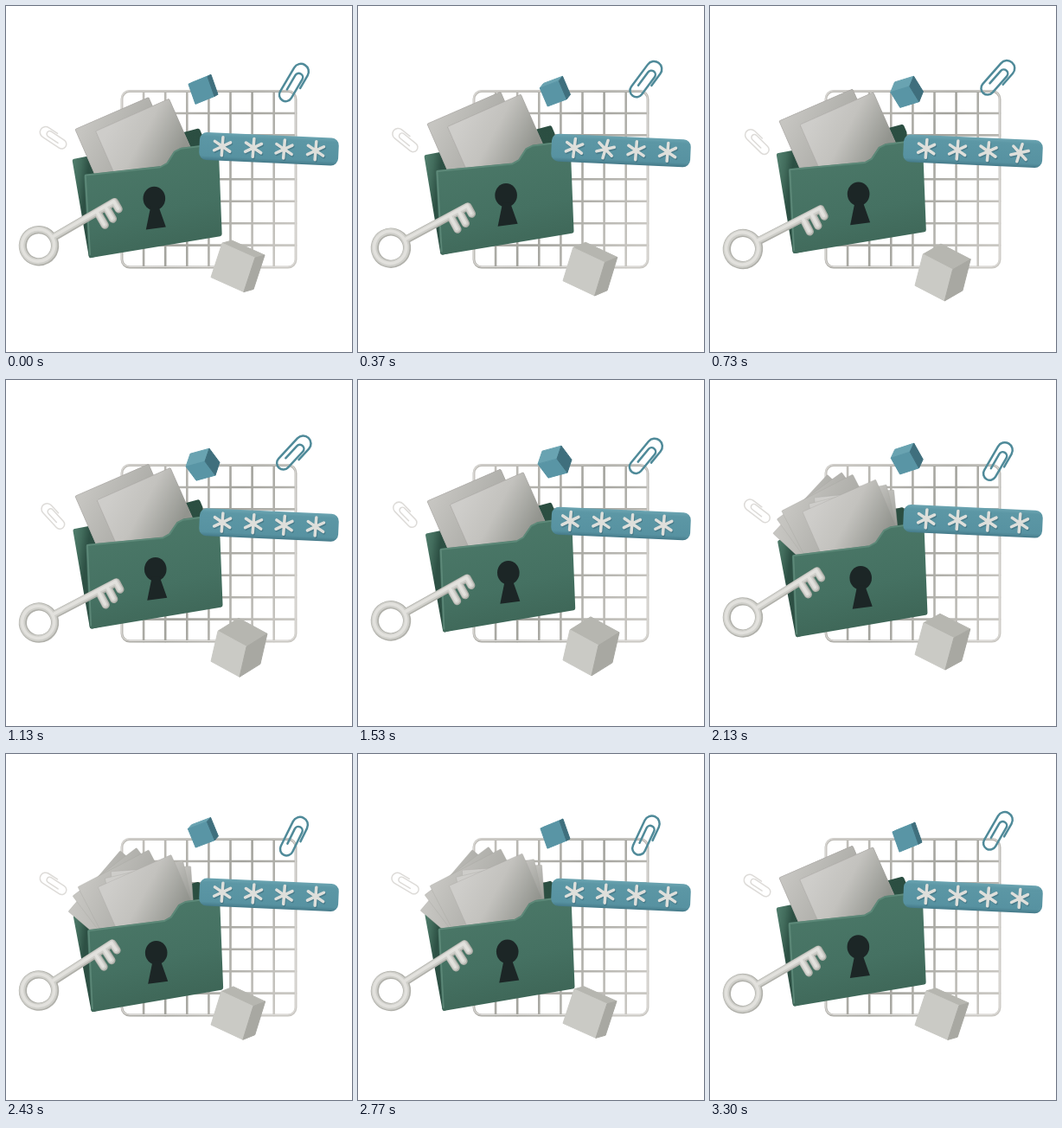
Animation, 400 px wide and 400 px high, one loop 3.33 s. Source, as an HTML page:

```html
<!DOCTYPE html>
<html lang="en">
<head>
<meta charset="utf-8">
<title>Secure folder</title>
<style>
  html, body { margin: 0; width: 100%; height: 100%; overflow: hidden; background: #fff; }
  svg { display: block; width: 100vw; height: 100vh; }
  .line { fill: none; stroke-linecap: round; stroke-linejoin: round; }
  .round { stroke-linejoin: round; stroke-width: 5; }
</style>
</head>
<body>
<svg viewBox="0 0 400 400">
  <defs>
    <linearGradient id="green" gradientUnits="userSpaceOnUse" x1="150" y1="165" x2="180" y2="290">
      <stop offset="0" stop-color="#4b7868"/><stop offset=".6" stop-color="#457162"/><stop offset="1" stop-color="#3e6657"/>
    </linearGradient>
    <linearGradient id="dark" gradientUnits="userSpaceOnUse" x1="78" y1="180" x2="228" y2="200">
      <stop offset="0" stop-color="#4f7c6b"/><stop offset=".06" stop-color="#426c5c"/>
      <stop offset=".12" stop-color="#2d5044"/><stop offset="1" stop-color="#2b4e41"/>
    </linearGradient>
    <linearGradient id="sheet" x1=".2" y1="0" x2=".85" y2=".75">
      <stop offset="0" stop-color="#cecdca"/><stop offset=".45" stop-color="#c3c2be"/><stop offset="1" stop-color="#92948e"/>
    </linearGradient>
    <linearGradient id="sheetBack" x1=".1" y1="0" x2=".8" y2=".8">
      <stop offset="0" stop-color="#c6c5c1"/><stop offset="1" stop-color="#a3a39e"/>
    </linearGradient>
    <linearGradient id="wire" gradientUnits="userSpaceOnUse" x1="134" y1="150" x2="335" y2="250">
      <stop offset="0" stop-color="#c0beb9"/><stop offset=".5" stop-color="#a3a39d"/><stop offset="1" stop-color="#c9c7c2"/>
    </linearGradient>
    <linearGradient id="teal" x1="0" y1="0" x2="0" y2="1">
      <stop offset="0" stop-color="#6ba4b1"/><stop offset=".15" stop-color="#5c97a5"/>
      <stop offset=".85" stop-color="#5792a1"/><stop offset="1" stop-color="#457a89"/>
    </linearGradient>
    <path id="clipShape" d="M9 2V-15a9 9 0 0 0-18 0V17a7.500 7.500 0 0 0 15 0V-8a4.700 4.700 0 0 0-9.400 0V11"/>
    <path id="starShape" d="M0-10.500V10.500M-9.100-5.200L9.100 5.200M-9.100 5.200L9.100-5.200"/>
    <g id="keyShape">
      <circle r="18.600"/>
      <path d="M19 0H101M78 1V17.500M89.500 1V16M101 1V9.500"/>
    </g>
  </defs>

  <g class="line" stroke="url(#wire)" stroke-width="2.600">
    <path id="mesh"/>
    <rect x="134" y="98.500" width="201" height="203.500" rx="9" stroke-width="2.900"/>
    <rect x="133.700" y="98" width="201" height="203.500" rx="9" stroke="#dddbd8" stroke-width="1.200"/>
  </g>

  <polygon id="back" class="round" fill="url(#dark)" stroke="url(#dark)"/>
  <g id="sheets"></g>
  <polygon id="front" class="round" fill="url(#green)" stroke="url(#green)"/>
  <polyline id="rim" class="line" stroke="#6b9786" stroke-width="1.800" opacity=".6"/>
  <g id="hole" fill="#1c2626">
    <ellipse rx="12.800" ry="13.800"/>
    <path d="M-4 9L-9.500 36 13.500 33 5 9z"/>
  </g>

  <g id="whiteCube"></g>
  <g id="blueCube"></g>

  <g id="bar">
    <rect x="-80.500" y="-16" width="161" height="32" rx="8.500" fill="url(#teal)"/>
    <g id="stars" class="line" stroke-width="3.500"></g>
  </g>

  <g id="blueClip" class="line" stroke="#4f8a99" stroke-width="2.500"><use href="#clipShape"/></g>
  <g id="whiteClip" class="line" stroke="#dddbd8" stroke-width="2.100"><use href="#clipShape"/></g>

  <g id="key" class="line">
    <use href="#keyShape" stroke="#b0b0aa" stroke-width="9.200"/>
    <use href="#keyShape" stroke="#cfcfca" stroke-width="7" x="-.3" y="-.6"/>
    <use href="#keyShape" stroke="#e2e1dd" stroke-width="3.600" x="-.4" y="-1"/>
  </g>
</svg>
<script>
const LOOP = 3330;
const $ = id => document.getElementById(id);
let now = 0;

// Sine swing around mid that is highest at the time peak
const wave = (mid, amp, peak) => mid + amp * Math.cos(2 * Math.PI * (now - peak) / LOOP);
const ease = x => { x = Math.min(1, Math.max(0, x)); return x * x * (3 - 2 * x); };
const bump = (mid, half) => {
  const d = Math.abs(now - mid) / half;
  return d < 1 ? (1 + Math.cos(Math.PI * d)) / 2 : 0;
};
const mix = (a, b, k) => a + (b - a) * k;
const points = (el, list) => el.setAttribute('points', list.map(p => p.map(v => v.toFixed(2)).join()).join(' '));
const place = (id, x, y, turn = 0, scale = 1) =>
  $(id).setAttribute('transform', `translate(${x} ${y}) rotate(${turn}) scale(${scale})`);
const add = (parent, tag, attrs) => {
  const el = document.createElementNS('http://www.w3.org/2000/svg', tag);
  for (const name in attrs) el.setAttribute(name, attrs[name]);
  return parent.appendChild(el);
};

let mesh = '';
for (let i = 1; i < 8; i++) mesh += `M${134 + 25.1 * i} 99V302M134 ${98.5 + 25.45 * i}H335`;
$('mesh').setAttribute('d', mesh);

// Fan offsets of each sheet: x, y, turn
const sheets = [
  ['back', -8, 30, -26], ['back', -3, 12, -13.5], ['back', 3, 1.5, -4],
  ['front', 15, -18, 20], ['front', 8, -10, 10.8], ['front', 0, 0, 0]
].map(([base, dx, dy, turn]) => ({
  base, dx, dy, turn,
  el: add($('sheets'), 'rect', {
    width: 92.5, height: 84, rx: 1,
    fill: base === 'front' ? 'url(#sheet)' : 'url(#sheetBack)',
    stroke: '#a3a29d', 'stroke-width': .5, 'stroke-opacity': .6
  })
}));

const stars = [-54, -18, 17.5, 54].map(x => {
  const el = add($('stars'), 'g', {});
  add(el, 'use', { href: '#starShape', stroke: '#3c6b79', x: 1, y: 1.3, opacity: .6 });
  add(el, 'use', { href: '#starShape', stroke: '#dedfdb' });
  return { x, el };
});

// A cube pose is its near corner followed by its left, right and down edges
function makeCube(id, colors, from, to) {
  const faces = colors.map(c => add($(id), 'polygon', { fill: c, stroke: c, 'stroke-linejoin': 'round' }));
  return (k, dy) => {
    const [x, y, lx, ly, rx, ry, bx, by] = from.map((v, i) => mix(v, to[i], k));
    const at = (l, r, b) => [x + l * lx + r * rx + b * bx, y + dy + l * ly + r * ry + b * by];
    points(faces[0], [at(0, 0, 0), at(1, 0, 0), at(1, 1, 0), at(0, 1, 0)]);
    points(faces[1], [at(0, 0, 0), at(1, 0, 0), at(1, 0, 1), at(0, 0, 1)]);
    points(faces[2], [at(0, 0, 0), at(0, 1, 0), at(0, 1, 1), at(0, 0, 1)]);
  };
}
const whiteCube = makeCube('whiteCube', ['#b6b6b0', '#cacac5', '#a8a8a2'],
  [288, 292.5, -38, -17, 11, -3, -13, 39.5], [278, 307, -33, -18, 24, -15, -8, 35]);
const blueCube = makeCube('blueCube', ['#69a3b1', '#5995a5', '#3f6f7d'],
  [233, 82.5, -22, 9, 4, -2, 8, 23], [230, 95, -22, 6, 5, -15, 12, 16]);

function drawFolder() {
  const sway = (mid, amp) => wave(mid, amp, 1950);
  const bob = (mid, amp) => wave(mid, amp, 2420);
  const bottomLeft = [wave(99.5, 1.8, 2050), bob(289.5, 6)];
  const top = [
    [sway(95, 2.5), bob(198, 7.6)],
    [sway(182, 3), bob(188.5, 6)],
    [sway(190, 3), bob(184, 6)],
    [sway(199, 3.5), bob(170.5, 5.5)],
    [sway(206, 3.5), bob(167, 5.5)],
    [sway(244, 1), bob(162, 5.5)]
  ];
  points($('front'), [...top, [sway(248, 1), bob(264.5, 5.7)], bottomLeft]);
  points($('rim'), [bottomLeft, ...top].map(([x, y]) => [x - 1, y - 1.3]));
  points($('back'), [
    [sway(80, .8), bob(180.5, 8)], [190, bob(158, 6)], [207, bob(149, 5.5)],
    [222, bob(145, 5.5)], [225, bob(152, 5.5)], [230, 255], bottomLeft
  ]);
  place('hole', sway(172.7, 1.6), bob(223.5, 6.2));

  const fan = ease((now - 1560) / 700) * (1 - ease((now - 2770) / 490));
  for (const s of sheets) {
    const [x, y, turn] = s.base === 'front'
      ? [sway(105.3, 1.7), wave(145.5, 8.3, 2450), -23.8]
      : [80, wave(142.5, 9.7, 2500), -23.5];
    s.el.setAttribute('transform',
      `translate(${x + s.dx * fan} ${y + s.dy * fan}) rotate(${turn + s.turn * fan})`);
  }
}

function draw(t) {
  now = t % LOOP;
  drawFolder();

  const turn = ease(wave(.5, .5, 1380));
  whiteCube(turn, wave(-1.2, 2.8, 900));
  blueCube(turn, wave(-3, 4.2, 590));

  place('bar', 304, wave(165.3, 2.6, 850), 2.6);
  const slide = -5 * bump(1600, 420);
  stars.forEach((s, i) => s.el.setAttribute('transform',
    `translate(${s.x + slide} -.5) rotate(${2 + 13 * bump(230 + 170 * i, 200)})`));

  place('blueClip', 333.3, wave(89.3, 6, 2450), wave(34, 9, 1050));
  place('whiteClip', 54.8, wave(153.2, 4, 1000), wave(-51, 8.5, 1200), .72);
  place('key', 38, wave(277.3, 3.8, 850), wave(-30, 2.8, 850));
}

function tick() {
  draw(performance.now());
  requestAnimationFrame(tick);
}
tick();
</script>
</body>
</html>
```
